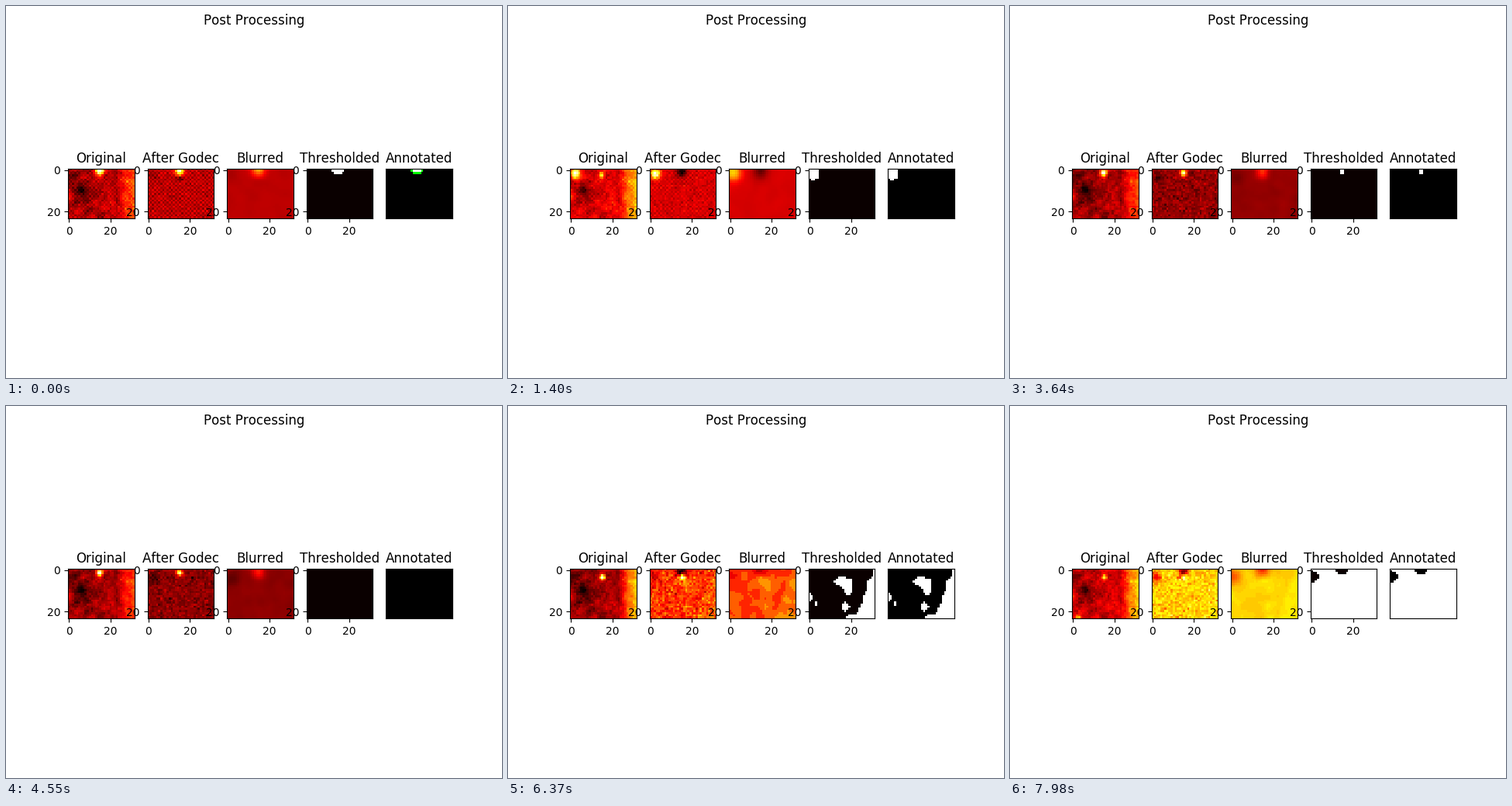
Animation, 640 px wide and 480 px high, one loop 8 s. Source, as a matplotlib script:

```python
import numpy as np
import matplotlib.pyplot as plt
from matplotlib.animation import FuncAnimation

plt.rcParams['text.kerning_factor'] = 6  # whole-pixel letter spacing

ROWS, COLS = 24, 32
LOOP, INTERVAL, STEP = 8000, 40, 70
Y, X = np.mgrid[0:ROWS, 0:COLS].astype(float)


def bump(x, y, wx, wy=None):
    return np.exp(-((X - x) / wx) ** 2 - ((Y - y) / (wy or wx)) ** 2)


def ramp(v):
    v = np.clip(v, 0, 1)
    return v * v * (3 - 2 * v)


def kernel(n, sigma):
    i = np.arange(n)
    k = np.exp(-(i[:, None] - i) ** 2 / (2 * sigma ** 2))
    return k / k.sum(axis=1, keepdims=True)


def blur(a, sigma):
    return kernel(ROWS, sigma) @ a @ kernel(COLS, sigma).T


rng = np.random.default_rng(5)
GRAIN = rng.normal(0, 1, X.shape)
CLOUD = blur(rng.normal(0, 1, X.shape), 1.2)
CHECKER = (-1.0) ** (X + Y)

# The room: a cold spot on the left, warmer towards the right wall
ROOM = (.27 - .15 * bump(6, 10.5, 3, 2.4) - .1 * bump(5, 9, 9, 10)
        - .06 * bump(23.5, 8, 2, 7) + .15 * CLOUD + .025 * GRAIN)
RIGHT = ramp((X - 21) / 11)

# Areas that heat up late: the slanted right wall and a few patches
WALL = ramp((X - 30.5 + .35 * Y) / 3 + .55)
PATCHES = (bump(17.2, 5.8, 4, 2.8) + .8 * bump(18.5, 10, 2, 2.6)
           + .7 * bump(17, 18, 2, 3) + .8 * bump(3.3, 16, 1.5, 1.8)
           + .8 * bump(21, 23, 6, 1.6))
WARM = WALL + PATCHES + .2 * bump(17, 14, 7, 10) + .7 * CLOUD


def outline(mask):
    m = np.pad(mask, 1, mode='edge')
    inner = m[:-2, 1:-1] & m[2:, 1:-1] & m[1:-1, :-2] & m[1:-1, 2:]
    return mask & ~inner


def panels(step):
    t = step * STEP
    noise = np.random.default_rng(100 + step).normal(0, 1, (2, *X.shape))

    # Phases: a visitor in the corner, slow cooling, then two rises
    visit = np.exp(-((t - 1400) / 450) ** 2)
    cool = ramp(t / 5460)
    late = ramp((t - 5460) / 910)
    end = ramp((t - 6370) / 1610)

    sink = ramp((t - 2450) / 1200)
    spot = bump(14.6 + .5 * late, .8 + sink + 2 * (late + visit),
                2 - .6 * cool - .2 * late - .7 * visit)
    left = bump(2 + cool - 1.5 * late, 3 + 1.5 * cool - visit - .6 * late, 2.4)
    ghost = bump(14.7, 1.2, 2.4)
    shade = bump(15, 4.6, 1.8, .9) * (1 - sink) * (1 - visit)
    checker = .045 * (1 - ramp(t / 2800)) * CHECKER
    base = .265 - .08 * cool + .055 * visit + .245 * late + .24 * end

    raw = (ROOM + .07 * visit - .03 * cool + .07 * end + .6 * checker
           + (.22 + .08 * visit + .2 * late - .06 * end) * RIGHT
           + (.9 - .4 * visit - .45 * end) * spot
           + (.8 * visit - .04) * left + .35 * end * bump(2.5, 23, 1.3)
           + .014 * noise[0])

    fore = (base + (.78 * (1 - visit) - .13 * late - .3 * end) * spot
            + (.75 * visit - .05 - .1 * cool - .17 * end) * left
            - (.34 * visit + .45 * late + .05 * end) * ghost - .22 * shade)
    heat = (.1 * late - .06 * end) * WARM
    grit = (.025 + .02 * cool + .025 * late - .015 * end) * noise[1]

    godec = fore + checker + grit + .8 * heat
    soft = blur(np.clip(fore + grit, 0, 1), 1.8) + heat
    mask = soft > base + .17 + .05 * cool - .165 * late - .175 * end

    # Coarse levels show once the signal range shrinks
    level = .004 + .08 * late - .065 * end
    shown = np.round(soft / level + .25) * level

    marked = np.repeat(mask[..., None], 3, axis=2).astype(float)
    if t < 420:
        marked[outline(mask)] = (0, 1, 0)
    return raw, godec, shown, mask.astype(float), marked


fig, axes = plt.subplots(1, 5, figsize=(6.4, 4.8), dpi=100)
fig.suptitle('Post Processing', fontsize=12)
names = ['Original', 'After Godec', 'Blurred', 'Thresholded', 'Annotated']
images = []
for ax, name, data in zip(axes, names, panels(0)):
    images.append(ax.imshow(data, cmap='hot', vmin=0, vmax=1,
                            interpolation='nearest'))
    ax.set_title(name, fontsize=12)
    ticks = [] if name == 'Annotated' else [0, 20]
    ax.set_xticks(ticks)
    ax.set_yticks(ticks)


def update(i):
    step = (i * INTERVAL + INTERVAL // 2) // STEP
    for im, data in zip(images, panels(step)):
        im.set_data(data)
    return images


anim = FuncAnimation(fig, update, frames=LOOP // INTERVAL, interval=INTERVAL,
                     repeat=True, repeat_delay=0, blit=False)
plt.show()
```
